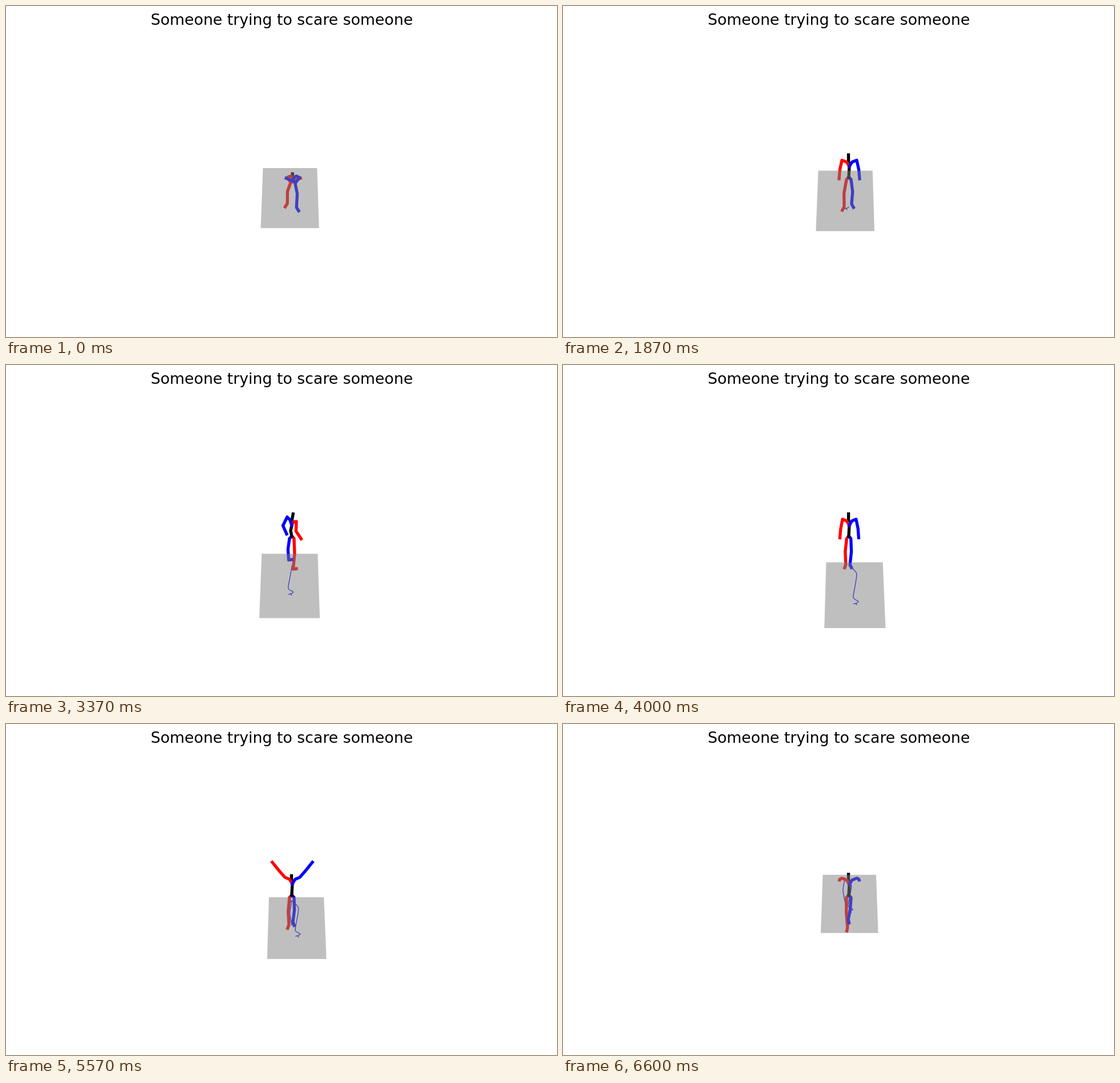
Recreate the animation shown at these times as an HTML page with a canvas. Size 966 px wide and 580 px high, loop 6.63 s.

```html
<!DOCTYPE html>
<html lang="en">
<head>
<meta charset="utf-8">
<style>
  html, body { margin: 0; width: 966px; height: 580px; overflow: hidden; background: #fff; }
  canvas { display: block; }
</style>
</head>
<body>
<canvas id="stage" width="966" height="580"></canvas>
<script>
const ctx = document.getElementById('stage').getContext('2d');
const LOOP = 6630, FRAME = LOOP / 199;
const CX = 501, HORIZON = -1070, ROOT_Y = 352;

// Smooth curve through keys [time, ...values], without overshoot
function track(...keys) {
  const last = keys.length - 1;
  const rate = (i, j) => i < 0 || i >= last ? 0
    : (keys[i + 1][j] - keys[i][j]) / (keys[i + 1][0] - keys[i][0]);
  const slope = (i, j) => {
    const a = rate(i - 1, j), b = rate(i, j);
    return a * b > 0 ? 2 * a * b / (a + b) : 0;
  };
  return t => {
    t = Math.min(t, keys[last][0]);
    let n = 0;
    while (n < last - 1 && t > keys[n + 1][0]) n++;
    const h = keys[n + 1][0] - keys[n][0], s = (t - keys[n][0]) / h;
    return keys[n].slice(1).map((v, i) => {
      const j = i + 1, d = keys[n + 1][j] - v;
      const m0 = slope(n, j) * h, m1 = slope(n + 1, j) * h;
      return v + s * (m0 + s * (3 * d - 2 * m0 - m1 + s * (m0 + m1 - 2 * d)));
    });
  };
}

// Heights of hips, chest and head
const torso = track([0, 306, 302, 294], [420, 302, 288, 268], [830, 309, 315, 300.5],
  [1350, 300, 281, 261], [4100, 300, 281, 261], [4600, 300, 281, 266.5],
  [5570, 300, 280, 266], [6600, 300, 281, 263.5]);
// Outward angles from straight down, then visible lengths, of upper arm and forearm
const arms = track([0, -36, -113, 10.5, 18.5], [830, -2, -41, 15.5, 17.5],
  [1350, 12, 5, 17, 16], [4100, 12, 5, 17, 16], [4550, 140, 142, 17, 17],
  [6270, 138, 140, 17, 17.5], [6600, 65, 20, 4, 1.5]);
// Distance of the feet from the middle, and how far red stands in front
const stance = track([0, 8, -3.5], [830, 7, -3.5], [1870, 6.5, 2.5], [2600, 4, 0],
  [4100, 4, 0], [4730, 2.5, 5.5], [5570, 3.5, 2.5], [6600, .7, 7]);
// Way the body faces (1 to the viewer, -1 away) and strength of the walk
const facing = track([2150, 1, 0], [2600, -1, 1], [3600, -1, 1], [4050, 1, 0]);
// Route over the floor, as seen from one fixed view
const route = track([0, 514, 414.4], [830, 511.8, 412], [1350, 509, 412.8], [1870, 517, 409],
  [2600, 508, 401], [3370, 514, 362], [4130, 499, 346], [4730, 501, 352],
  [5150, 498.5, 370], [5570, 501.9, 392], [6600, 509.5, 439]);

function figure(t) {
  const [hipY, chestY, headY] = torso(t);
  const [upper, fore, upperLen, foreLen] = arms(t);
  const [spread, lead] = stance(t);
  const [turn, walk] = facing(Math.max(t, 2150));
  const swing = walk * Math.cos(Math.PI * (t - 3370) / 380);
  const x = CX + (hipY - 300) * .3, rise = hipY - chestY;
  const root = [x, hipY], chest = [x + 1 - walk, chestY];

  const spine = [root, [x + .5 - 2.5 * walk, (hipY + chestY) / 2], chest,
    [x - .5 + walk, (chestY + headY) / 2], [x - .5 + 2.8 * walk, headY]];

  const leg = side => {
    const out = side * turn, step = -side * (lead + 8 * swing);
    const ankle = [x - 1.5 + out * spread, 349.5 + step];
    return [root, [x + out * 4, hipY + 4],
      [x - .8 + out * (3 + spread * .7), 327 + step * .5], ankle,
      [ankle[0] + (1 - walk) * out * (1 + spread * .35) + 5.5 * walk,
       ankle[1] + 6 - 6.5 * walk]];
  };

  const arm = side => {
    const out = side * turn, sway = side * swing;
    const bone = ([px, py], angle, length) => {
      const a = angle * Math.PI / 180;
      return [px + out * length * Math.sin(a), py + length * Math.cos(a)];
    };
    const drop = 1 - .62 * rise - 4 * sway;
    const shoulder = [chest[0] + out * (10 + .16 * rise - 5 * walk), chestY + drop];
    const elbow = bone(shoulder, upper + 14 * sway, upperLen);
    return [chest, [chest[0] + out * (5 - 2 * walk), chestY + drop * .4 - 3.5],
      shoulder, elbow, bone(elbow, fore - 29 * sway, foreLen)];
  };

  return [['#f00', leg(-1)], ['#00f', leg(1)], ['#000', spine],
    ['#f00', arm(-1)], ['#00f', arm(1)]];
}

// Floor coordinates: sideways position and depth
const toFloor = ([x, y]) => [(x - CX) / (y - HORIZON), 1 / (y - HORIZON)];
const toScreen = ([x, d]) => [CX + x / d, HORIZON + 1 / d];

const home = toFloor([CX, ROOT_Y]);
const MID = .0065, HALF = .03505, FAR = 1 / 1410.5, NEAR = 1 / 1525;
const floor = [[MID - HALF, FAR], [MID + HALF, FAR], [MID + HALF, NEAR], [MID - HALF, NEAR]];

function trace(points) {
  ctx.beginPath();
  points.forEach(p => ctx.lineTo(...p));
}

function line(points, color, width) {
  ctx.strokeStyle = color;
  ctx.lineWidth = width;
  trace(points);
  ctx.stroke();
}

function draw(t) {
  ctx.fillStyle = '#fff';
  ctx.fillRect(0, 0, 966, 580);
  ctx.fillStyle = '#000';
  ctx.font = '26.75px "DejaVu Sans", sans-serif';
  ctx.textAlign = 'center';
  ctx.fillText('Someone trying to scare someone', 483.5, 32.5);

  const here = toFloor(route(t));
  const place = p => toScreen(p.map((v, i) => v + home[i] - here[i]));
  const trail = [];
  for (let s = 0; s < t; s += FRAME) trail.push(place(toFloor(route(s))));

  ctx.lineJoin = 'round';
  ctx.lineCap = 'square';
  line(trail, '#00f', 1.33);
  figure(t).forEach(([color, limb]) => line(limb, color, 5.33));

  ctx.fillStyle = 'rgba(128, 128, 128, .5)';
  trace(floor.map(place));
  ctx.fill();
}

const start = performance.now();
function tick() {
  const t = (performance.now() - start) % LOOP;
  draw(Math.floor(t / FRAME) * FRAME);
  requestAnimationFrame(tick);
}
tick();
</script>
</body>
</html>
```
